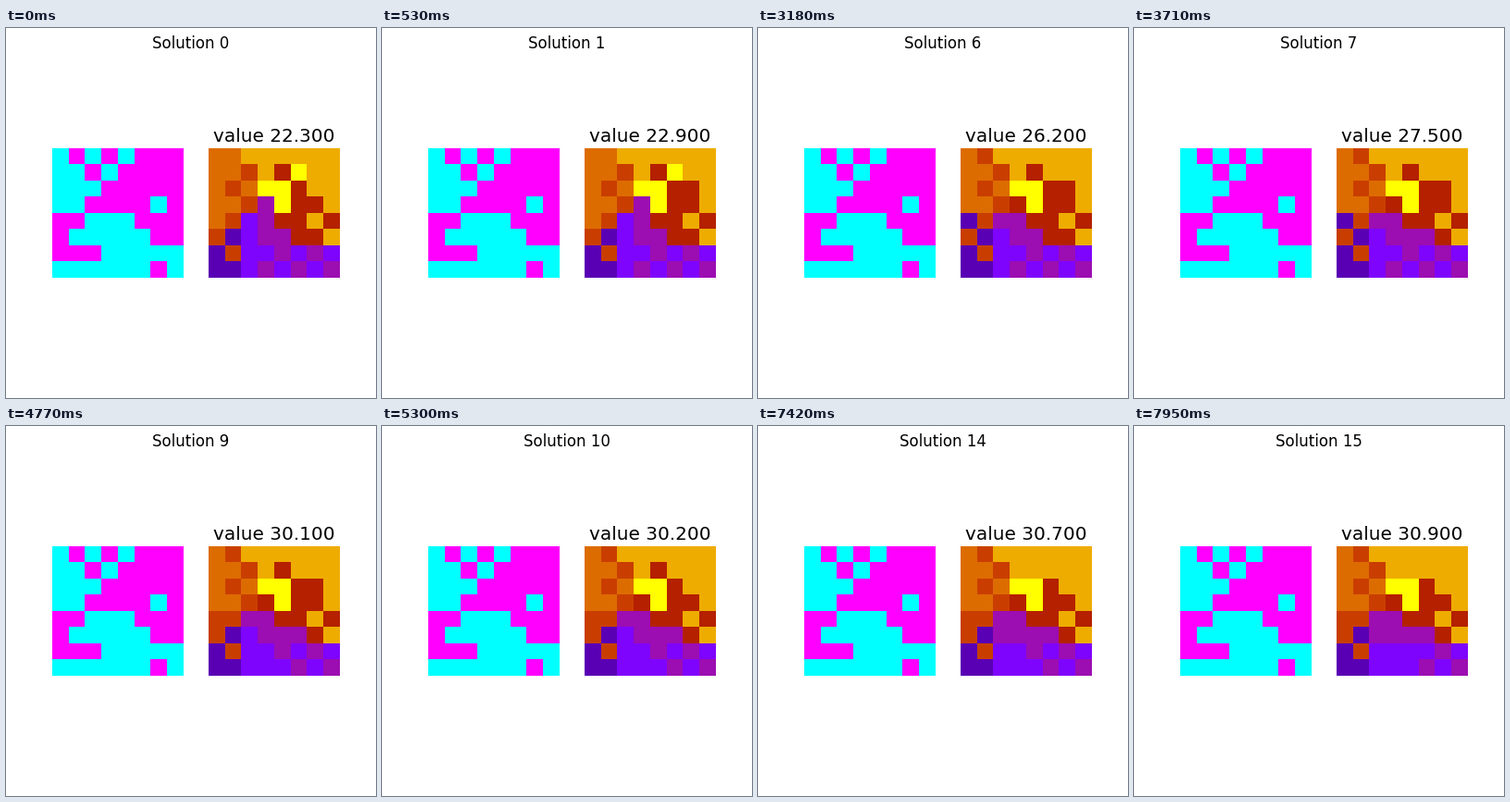
Animation of 400 by 400 pixels, one loop 8 s. Source, as a matplotlib script:

```python
import numpy as np
import matplotlib.pyplot as plt
from matplotlib.animation import FuncAnimation

SIZE, DPI = 400, 100
INTERVAL, LOOP, HOLD = 20, 8000, 530
WIDTH, HEIGHT, BOTTOM = 142, 140, 130
r, c = np.mgrid[:8, :8]


def make_votes():
    """Two parties: one in the upper right and lower left, mixed at the top."""
    upper = (r < 4) & (r + c >= 5)
    middle = (r >= 4) & (r < 6) & (c > r)
    lower = (r > 3) & (c < np.select([r == 4, r == 5, r == 6], [2, 1, 3], 0))
    mixed = (r < 2) & (c > 0) & ((r + c) % 2 == 1)
    votes = upper | middle | lower | mixed
    votes[[3, 7], 6] ^= True
    return votes


def make_districts():
    """Districts 1 to 8, laid over each other as blocks."""
    d = np.full((8, 8), 7)
    d[:5, :2] = d[2, 2] = 6
    d[5:, :2] = 1
    d[4:, 2] = 2
    d[range(1, 7), [2, 1, 2, 1, 0, 1]] = 5
    d[2:6, 5:7] = d[1, 4] = d[4, 4] = d[4, 7] = 4
    d[[2, 4], 6] = 7
    d[3:6, 3] = d[5, 4] = 3
    d[2, 3:5] = d[3, 4] = d[1, 5] = 8
    checker = (r > 5) & (c > 2)
    return np.where(checker, 3 - (r + c) % 2, d)


def reassign(grid, row, col, district=None):
    """Move a cell to a district, by default the commonest other one around."""
    grid = grid.copy()
    if district is None:
        near = grid[max(row - 1, 0):row + 2, max(col - 1, 0):col + 2]
        counts = np.bincount(near.ravel())
        counts[grid[row, col]] = 0
        district = counts.argmax()
    grid[row, col] = district
    return grid


def enlarge(grid):
    """Scale an 8x8 grid to screen pixels with hard cell edges."""
    rows = ((np.arange(HEIGHT) + 0.5) * 8 / HEIGHT).astype(int)
    cols = ((np.arange(WIDTH) + 0.5) * 8 / WIDTH).astype(int)
    return grid[np.ix_(rows, cols)].astype(float)


border = (2, 6)
moves = [border, (4, 2), (3, 3, 4), (1, 5), (0, 1), (4, 0, 1), (5, 5), (4, 0),
         (7, 3), border, (5, 2), border, (1, 4), border, (6, 4)]
grids = [make_districts()]
for move in moves:
    grids.append(reassign(grids[-1], *move))
pictures = [enlarge(grid) for grid in grids]
values = np.interp(range(len(grids)), range(0, 16, 3),
                   [22.3, 24.0, 26.2, 30.1, 30.3, 30.9]).round(1)

plt.rcParams["font.family"] = "DejaVu Sans"
fig = plt.figure(figsize=(SIZE / DPI, SIZE / DPI), dpi=DPI, facecolor="white")
fig.figimage(enlarge(make_votes()), 50, BOTTOM, cmap="cool", vmin=0, vmax=1,
             origin="upper")
districts = fig.figimage(pictures[0], 219, BOTTOM, cmap="gnuplot",
                         vmin=0, vmax=8, origin="upper")
heading = fig.suptitle("", fontsize=12)
label = fig.text(289.55 / SIZE, 277.4 / SIZE, "", fontsize=14.4,
                 ha="center", va="baseline")


def update(i):
    k = min((i * INTERVAL + INTERVAL // 2) // HOLD, len(grids) - 1)
    districts.set_data(pictures[k])
    heading.set_text(f"Solution {k}")
    label.set_text(f"value {values[k]:.3f}")
    return districts, heading, label


anim = FuncAnimation(fig, update, frames=LOOP // INTERVAL, interval=INTERVAL,
                     init_func=lambda: update(0), repeat=True, repeat_delay=0)
plt.show()
```
